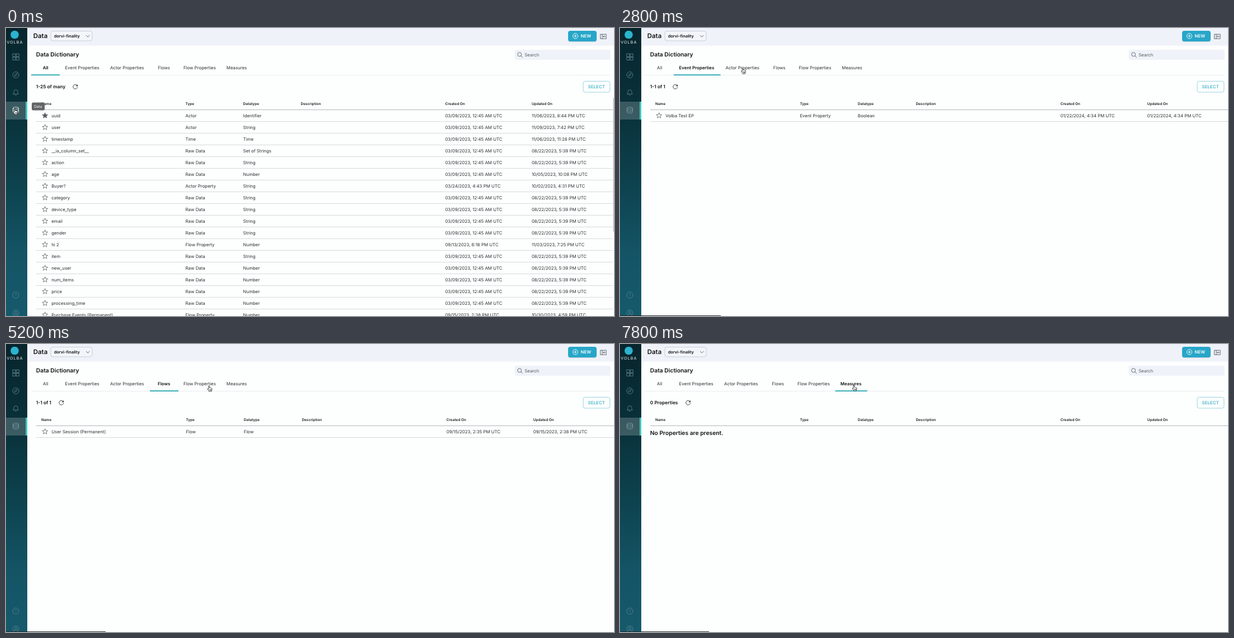
Animation, 1086 px wide and 516 px high, one loop 8000 ms. Source, as an HTML page:

```html
<!DOCTYPE html>
<html lang="en">
<head>
<meta charset="utf-8">
<title>Data Dictionary</title>
<style>
  html, body { margin: 0; width: 100%; height: 100%; overflow: hidden; background: #fdfefe; }
  svg { display: block; width: 1086px; height: 516px; }
  text { font-family: Inter, "Liberation Sans", sans-serif; font-size: 7.85px; fill: #2b2d30;
         text-rendering: geometricPrecision; white-space: pre; }
  .bold { font-weight: 600; fill: #111; }
  .head { font-weight: 600; font-size: 6.45px; fill: #1c1e20; }
  .big { font-size: 10.3px; }
  .line { fill: none; stroke-linecap: round; stroke-linejoin: round; }
</style>
</head>
<body>
<script>
const LOOP = 8000, STEP = 200;
const NS = 'http://www.w3.org/2000/svg';

function el(tag, attrs, parent) {
  const e = document.createElementNS(NS, tag);
  for (const k in attrs) e.setAttribute(k, attrs[k]);
  if (parent) parent.appendChild(e);
  return e;
}
const svg = el('svg', { viewBox: '0 0 1086 516', width: 1086, height: 516 }, document.body);
const group = (parent = svg) => el('g', {}, parent);
const rect = (p, x, y, width, height, fill, more) =>
  el('rect', { x, y, width, height, fill, ...more }, p);
const text = (p, x, y, str, cls = '', more) => {
  const e = el('text', { x, y, class: cls, ...more }, p);
  e.textContent = str;
  return e;
};
const path = (p, d, stroke, width = 0.9, more) =>
  el('path', { d, stroke, 'stroke-width': width, class: 'line', ...more }, p);
const circle = (p, cx, cy, r, more) => el('circle', { cx, cy, r, ...more }, p);
const show = (e, on) => e.setAttribute('visibility', on ? 'visible' : 'hidden');

// Sidebar
const defs = el('defs', {}, svg);
const grad = el('linearGradient', { id: 'side', x1: 0, y1: 0, x2: 0, y2: 1 }, defs);
[[0, '#08252d'], [0.3, '#09323b'], [0.55, '#0d434f'], [0.78, '#145465'], [1, '#155a6c']].forEach(
  ([offset, color]) => el('stop', { offset, 'stop-color': color }, grad));
const side = group();
rect(side, 0, 0, 38, 516, 'url(#side)');
circle(side, 15.5, 12, 7.3, { fill: '#2bb3cf' });
text(side, 1.2, 28, 'VOLBA', '', { style: 'font-size:7.2px;letter-spacing:1.1px;fill:#e4edef' });
rect(side, 0, 132, 38, 32, '#fff', { opacity: 0.2 });
rect(side, 35, 132, 3, 32, '#3cc8bd');

const DIM = '#5b838d';
for (const x of [12, 18.2]) for (const y of [46.2, 52.4])
  rect(side, x, y, 5, 5, 'none', { stroke: DIM, 'stroke-width': 0.9 });
const ring = (y, r = 5.5) => circle(side, 17.5, y, r, { fill: 'none', stroke: DIM, 'stroke-width': 0.9 });
ring(84);
path(side, 'M20 81.5L18.6 85.1L15 86.5L16.4 82.9Z', DIM, 0.8);
path(side, 'M12.8 118.4H22.2L21 116.6V114.2A3.5 3.5 0 0 0 14 114.2V116.6ZM16.2 120.2Q17.5 121.4 18.8 120.2', DIM);
ring(478.5);
text(side, 17.5, 481, '?', '', { 'text-anchor': 'middle', style: `font-size:7px;fill:${DIM}` });
ring(510.5);
ring(509.3, 2);
path(side, 'M13.8 514.2Q17.5 510.4 21.2 514.2', DIM);
const dataIcon = path(side,
  'M12.5 143.6A5 1.9 0 0 1 22.5 143.6A5 1.9 0 0 1 12.5 143.6V150.6A5 1.9 0 0 0 22.5 150.6V143.6M12.5 147.1A5 1.9 0 0 0 22.5 147.1', '#82a0a8');

// Top bar and page title
const page = group();
rect(page, 38, 0, 1048, 31.5, '#eff3f9');
text(page, 48.8, 18.2, 'Data', 'bold', { style: 'font-size:11.4px' });
rect(page, 80, 5.5, 74, 17.5, '#f2f5fa', { rx: 4, stroke: '#bfc5cc', 'stroke-width': 0.8 });
text(page, 85.7, 16.8, 'dorvi-finality', 'bold', { style: 'font-size:7.35px' });
path(page, 'M143.3 13.3L146.2 16L149.1 13.3', '#555');
rect(page, 1004, 6.2, 51, 19, '#9fb4be', { rx: 4, opacity: 0.45 });
rect(page, 1004, 5, 51, 19, '#27a6c8', { rx: 4 });
circle(page, 1017, 14.4, 4.6, { fill: 'none', stroke: '#fff', 'stroke-width': 0.9 });
path(page, 'M1014.7 14.4H1019.3M1017 12.1V16.7', '#fff');
text(page, 1026.6, 17.2, 'NEW', 'bold', { style: 'font-size:7.74px;fill:#fff' });
rect(page, 1061.7, 11.2, 10.4, 8, 'none', { stroke: '#555d66', 'stroke-width': 0.9 });
path(page, 'M1065 11.2V19.2M1070.8 15.2H1066.8M1068.4 13.5L1066.7 15.2L1068.4 16.9', '#555d66', 0.9);
text(page, 53.8, 51.2, 'Data Dictionary', 'bold big');
rect(page, 908.5, 39, 171.5, 18, '#eff3f9', { rx: 4 });
circle(page, 917.2, 47.3, 3.5, { fill: 'none', stroke: '#59606a', 'stroke-width': 0.9 });
path(page, 'M919.8 49.9L922.6 52.7', '#59606a');
text(page, 926.3, 51, 'Search', '', { style: 'fill:#555b63' });
rect(page, 45, 84, 1034, 1, '#e9edef');

const select = group();
rect(select, 1031, 95.4, 47.8, 19.6, '#fdfefe', { rx: 3.5, stroke: '#8fd0dc', 'stroke-width': 0.9 });
text(select, 1039.6, 107.9, 'SELECT', '', { style: 'font-size:7.74px;font-weight:500;letter-spacing:.15px;fill:#2cabc4' });

// Tabs: label, text x, anchor, underline x, underline width, growth when bold
const tabs = [
  ['All', 70.7, 'middle', 45, 51, 0],
  ['Event Properties', 105.6, 'start', 96, 83.5, 2.5],
  ['Actor Properties', 186, 'start', 177, 83, 2.5],
  ['Flows', 282.2, 'middle', 257, 51, 0],
  ['Flow Properties', 316.9, 'start', 307, 79, 2.3],
  ['Measures', 393.8, 'start', 384.5, 57, 2]
];
const labels = tabs.map(([name, x, anchor]) => text(svg, x, 73.9, name, '', { 'text-anchor': anchor }));
const underline = rect(svg, 45, 83.2, 51, 1.8, '#27a7b0');

function setTab(active) {
  const [, , , x, width, grow] = tabs[active];
  labels.forEach((label, i) => {
    label.setAttribute('class', i === active ? 'bold' : '');
    label.setAttribute('x', tabs[i][1] + (i > active ? grow : 0));
  });
  underline.setAttribute('x', x);
  underline.setAttribute('width', width);
}

// Lists
const MORNING = '03/09/2023, 12:45 AM UTC', AUGUST = '08/22/2023, 5:39 PM UTC';
const raw = (name, kind = 'String', updated = AUGUST) => [name, 'Raw Data', kind, MORNING, updated];
const buyer = ['Buyer?', 'Actor Property', 'String', '03/24/2023, 4:43 PM UTC', '10/02/2023, 4:31 PM UTC'];
const hi = ['hi 2', 'Flow Property', 'Number', '09/13/2023, 6:18 PM UTC', '11/03/2023, 7:25 PM UTC'];
const purchase = ['Purchase Events (Permanent)', 'Flow Property', 'Number', '09/15/2023, 2:38 PM UTC', '10/30/2023, 4:59 PM UTC'];
const lists = [
  ['1-25 of many', 123.8, [
    ['uuid', 'Actor', 'Identifier', MORNING, '11/06/2023, 8:44 PM UTC'],
    ['user', 'Actor', 'String', MORNING, '11/09/2023, 7:42 PM UTC'],
    ['timestamp', 'Time', 'Time', MORNING, '11/06/2023, 11:28 PM UTC'],
    raw('__ia_column_set__', 'Set of Strings'), raw('action'),
    raw('age', 'Number', '10/05/2023, 10:08 PM UTC'), buyer,
    raw('category'), raw('device_type'), raw('email'), raw('gender'), hi, raw('item'),
    raw('new_user', 'Number'), raw('num_items', 'Number'), raw('price', 'Number'),
    raw('processing_time', 'Number'), purchase]],
  ['1-1 of 1', 98.8, [
    ['Volba Test EP', 'Event Property', 'Boolean', '01/22/2024, 4:34 PM UTC', '01/22/2024, 4:34 PM UTC']]],
  ['1-3 of 3', 101.7, [buyer,
    ['string-set-names', 'Actor Property', 'Set of Strings', '01/03/2024, 5:06 PM UTC', '01/03/2024, 5:06 PM UTC'],
    ['time set-nola-testing', 'Actor Property', 'Time Set', '06/21/2023, 7:42 AM UTC', '12/27/2023, 8:42 PM UTC']]],
  ['1-1 of 1', 98.8, [
    ['User Session (Permanent)', 'Flow', 'Flow', '09/15/2023, 2:35 PM UTC', '09/15/2023, 2:38 PM UTC']]],
  ['1-2 of 2', 101, [hi, purchase]],
  ['0 Properties', 121.7, []]
];
const wide = [63, 321.4, 424.8, 528.4, 786.7, 941.7];
const narrow = [63, 320.6, 423.6, 526.6, 784.4, 938.9];
const titles = ['Name', 'Type', 'Datatype', 'Description', 'Created On', 'Updated On'];

function star(p, x, y, filled) {
  const pts = Array.from({ length: 10 }, (_, i) => {
    const a = i * Math.PI / 5, r = i % 2 ? 2.2 : 5.2;
    return `${(x + r * Math.sin(a)).toFixed(2)},${(y - r * Math.cos(a)).toFixed(2)}`;
  });
  el('polygon', { points: pts.join(' '), fill: filled ? '#565a60' : 'none',
    stroke: '#565a60', 'stroke-width': 0.8, 'stroke-linejoin': 'round' }, p);
}

function refresh(p, x, y) {
  path(p, `M${x + 3.2} ${y - 2.4}A4 4 0 1 0 ${x + 3.9} ${y + 1}`, '#3c4046', 1);
  path(p, `M${x + 4.3} ${y - 4.4}V${y - 0.8}H${x + 0.7}Z`, 'none', 0, { style: 'fill:#3c4046' });
}

const views = lists.map(([count, iconX, rows], n) => {
  const cols = n ? wide : narrow, right = n ? 1086 : 1084;
  const root = group(), body = group(root);
  titles.forEach((s, i) => text(root, cols[i], 138, s, 'head'));
  rect(root, 54, 146, right - 54, 1, '#b3b6b9');
  text(body, 53.8, 107.9, count, 'bold', { style: 'font-size:8.4px' });
  refresh(body, iconX, 105.2);
  rows.forEach(([name, type, kind, created, updated], i) => {
    const y = 157 + 21 * i, base = y + 2.7;
    star(body, 69.7, y, n === 0 && i === 0);
    text(body, 81.2, base, name);
    text(body, cols[1], base, type);
    text(body, cols[2], base, kind);
    text(body, cols[4], base, created);
    text(body, cols[5], base, updated);
    rect(body, 54, y + 10, right - 54, 1, '#d6d9db');
  });
  if (!rows.length) text(body, 53.8, 162.6, 'No Properties are present.', 'bold big');
  if (n === 0) rect(body, 1084.4, 125, 1.6, 240, '#c3c6c9', { rx: 0.8 });
  return { root, body };
});

// Tooltip, link bar and pointer
const tip = group();
rect(tip, 46, 133.5, 23, 14, '#626466', { rx: 2.5 });
text(tip, 50.3, 142.8, 'Data', '', { style: 'font-size:6.45px;fill:#fff' });
const linkBar = rect(svg, 0, 515, 0, 1, '#24282a');
const hand = el('path', {
  d: 'M-1.8 -5C-1 -5.3 -.5 -4.8 -.5 -4V-1.6C0 -2.1 .9 -2 1.1 -1.4C1.7 -1.8 2.4 -1.5 2.5 -.9C3.2 -1.1 3.8 -.7 3.8 0V1.8C3.8 3 3 3.7 2.9 5H-1.4C-1.6 3.6 -3 2.6 -3.8 .9C-4.1 .1 -3.3 -.4 -2.6 .2L-2.2 .7V-4C-2.2 -4.5 -2.1 -4.8 -1.8 -5ZM-.2 1.2V3.4M1.1 1.2V3.4M2.3 1.2V3.4',
  fill: '#fff', stroke: '#16181a', 'stroke-width': 0.8, 'stroke-linejoin': 'round'
}, svg);

const track = [
  [0, 17, 150], [200, 19, 148], [1200, 134.5, 76.5], [2400, 134.5, 76.5], [2800, 220.5, 77],
  [3400, 220.5, 77], [3600, 226, 83], [4000, 292, 81], [4800, 292, 81], [5200, 364, 80],
  [6000, 364, 80], [6600, 419, 79], [8000, 419, 79]
];
// time, tab, list loaded
const states = [
  [0, 0, 1], [1600, 1, 0], [2200, 1, 1], [3000, 2, 0], [3400, 2, 1], [4400, 3, 0],
  [4800, 3, 1], [5600, 4, 0], [6000, 4, 1], [6800, 5, 0], [7600, 5, 1]
];
const links = [[0, 0], [1400, 46], [1600, 180], [3800, 145], [5200, 178], [6400, 159]];
const latest = (keys, t) => keys.filter(k => k[0] <= t).pop();

function pointer(t) {
  const i = Math.max(1, track.findIndex(k => k[0] > t));
  const [t0, x0, y0] = track[i - 1], [t1, x1, y1] = track[i];
  const u = (t - t0) / (t1 - t0), e = u * u * (3 - 2 * u);
  return [x0 + (x1 - x0) * e, y0 + (y1 - y0) * e];
}

function draw(time) {
  // The screen refreshes five times a second
  const t = Math.floor((time % LOOP) / STEP) * STEP;
  const [, tab, loaded] = latest(states, t);
  setTab(tab);
  views.forEach(({ root, body }, i) => {
    show(root, i === tab);
    show(body, i === tab && loaded);
  });
  show(select, loaded);
  show(tip, t < 400);
  dataIcon.setAttribute('stroke', t < 400 ? '#f2f6f7' : '#82a0a8');
  linkBar.setAttribute('width', latest(links, t)[1]);
  hand.setAttribute('transform', `translate(${pointer(t)})`);
}

const start = performance.now();
function tick() {
  draw(performance.now() - start);
  requestAnimationFrame(tick);
}
tick();
</script>
</body>
</html>
```
